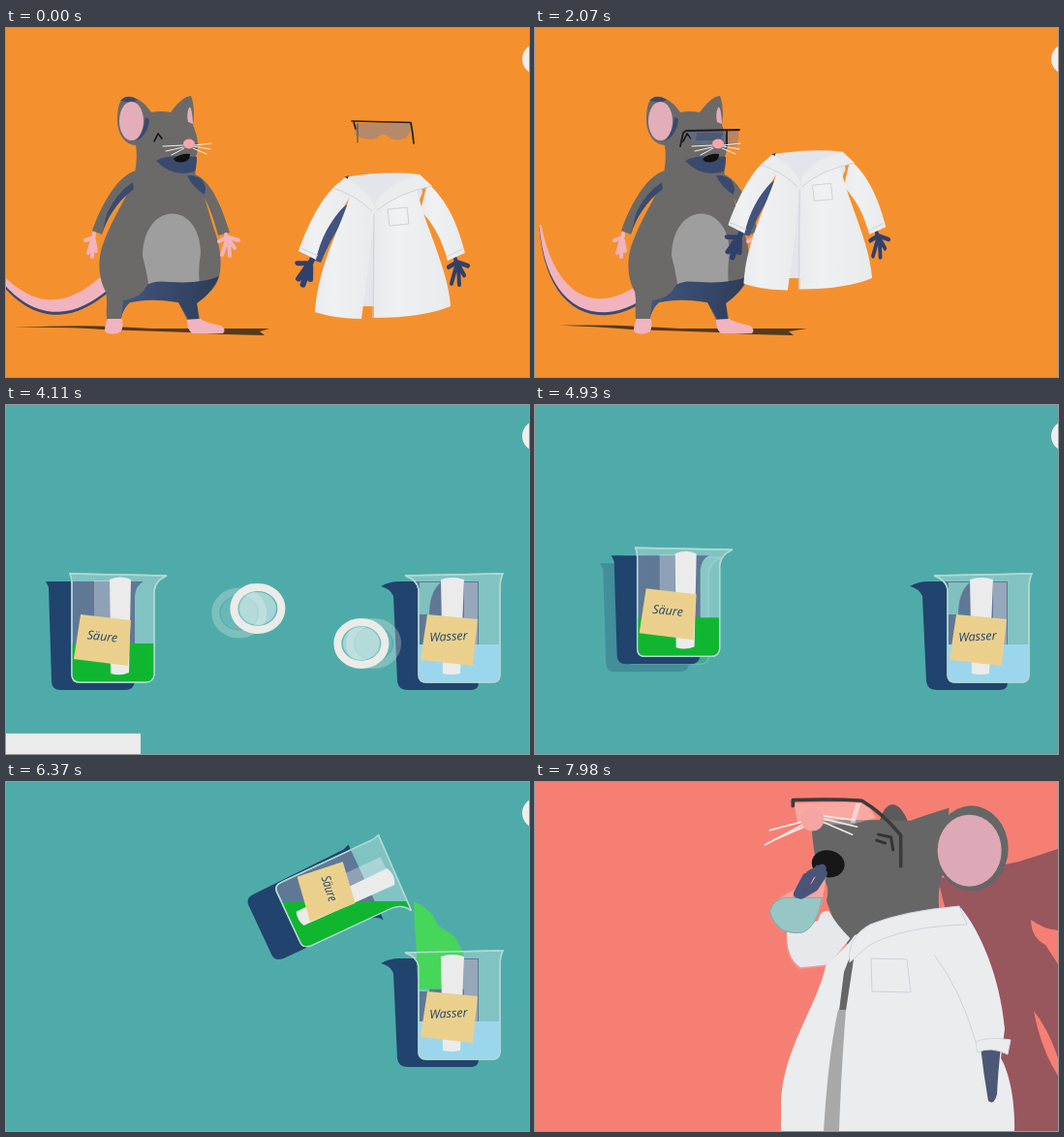
An HTML page for the animation above (8 s loop, 540 by 360 pixels).

```html
<!DOCTYPE html>
<html lang="de">
<head>
<meta charset="utf-8">
<title>Lab safety</title>
<style>
  html, body { margin: 0; width: 100%; height: 100%; overflow: hidden; background: #f5902e; }
  svg { display: block; width: 100vw; height: 100vh; }
  .grey { fill: #6b6a69; }
  .navy { fill: #3a4a6e; }
  .deep { fill: #21446e; }
  .pink { fill: #f1b4be; }
  .coat { fill: #ebecee; }
  .bar { fill: #ebebeb; }
  .glass { fill: #fff; fill-opacity: .28; stroke: #b2d8d3; stroke-width: 1.4; }
  .line { fill: none; stroke-linecap: round; stroke-linejoin: round; }
  .fold { fill: none; stroke: #cfd1da; stroke-width: 1; }
  .note { fill: #ebd08d; }
  .hand { font: italic 12.5px "Open Sans", "Noto Sans", sans-serif; fill: #21446e; text-anchor: middle; }
</style>
</head>
<body>
<svg viewBox="0 0 540 360" preserveAspectRatio="none">
  <defs>
    <path id="glassA" d="M66 174L166 176Q154 181 153 192V278Q152 286 144 286H76Q68 286 68 278V184Q68 178 66 174Z"/>
    <path id="glassB" d="M412 176L513 174Q510 180 510 190V278Q510 286 502 286H434Q426 286 426 278V190Q424 180 412 176Z"/>
    <clipPath id="inA"><use href="#glassA"/></clipPath>
    <clipPath id="inB"><use href="#glassB"/></clipPath>
    <clipPath id="flow"><rect id="flowBox" x="400" y="118" width="100" height="0"/></clipPath>
    <path id="pawL" class="line" stroke-width="4" d="M2-5L1 3M-1 0L-7 2M0 2L-4 15M1 2L0 19M2 2L4 13M0 0L1 5"/>
    <path id="pawR" class="line" stroke-width="4" d="M-1-4L1 3M0-1L-8 3M0 2L-5 17M2 2L3 18M2 1L8 10M2-1L12 2M1 0L2 5"/>
    <g id="ring">
      <ellipse rx="19" ry="17" fill="#fff" fill-opacity=".42"/>
      <ellipse rx="24.5" ry="22" fill="#fff" fill-opacity=".12" stroke="#ebebe8" stroke-width="8"/>
    </g>
    <linearGradient id="cloth">
      <stop offset="0" stop-color="#e8eaee"/><stop offset=".3" stop-color="#f0f1f2"/><stop offset="1" stop-color="#e9eaec"/>
    </linearGradient>
    <linearGradient id="dusk">
      <stop offset="0" stop-color="#40557f"/><stop offset="1" stop-color="#2f3c58"/>
    </linearGradient>
  </defs>

  <g id="dress">
    <rect width="540" height="360" fill="#f5902e"/>
    <path id="ground" fill="#533a1e"/>
    <path id="tailShade" class="navy"/>
    <path id="tail" class="pink"/>
    <g id="mouse">
      <path class="pink" d="M106 297L119 298Q122 306 119 313Q111 318 103 314Q100 311 106 297ZM187 299L198 298Q205 304 222 307Q228 311 224 315H192Q186 310 187 299Z"/>
      <path class="grey" d="M125 71C138 71 145 80 150 87Q160 85 170 87C176 79 184 70 191 70C195 80 194 92 193 100C198 112 200 122 196 133C196 142 195 148 196 154C204 167 209 190 215 208C223 230 223 248 219 260C214 272 204 278 197 284L200 300L187 301L178 283Q150 278 128 283C122 288 120 294 119 300L104 300C103 290 105 282 103 272C95 258 95 240 99 226C106 205 118 185 130 162C134 148 136 134 134 121C120 120 115 105 115 95C115 80 118 71 125 71Z"/>
      <path fill="#9e9e9e" d="M141 235C142 178 200 177 201 232Q198 250 200 264L147 264Q145 250 141 235Z"/>
      <path fill="url(#dusk)" d="M145 266Q150 260 170 262Q202 264 220 256Q214 272 197 284L199 300H188L178 283Q150 278 128 283Q122 288 119 298L121 281Q139 279 145 266Z"/>
      <path class="navy" d="M155 137Q166 130 197 133Q197 143 195 148Q172 155 155 137Z"/>
      <path class="navy" d="M118 75Q126 67 136 74L130 77ZM134 117Q147 110 148 94L144 92Q142 108 134 117Z"/>
      <ellipse fill="#e3aeb9" cx="129.500" cy="96" rx="12.500" ry="20"/>
      <path fill="#e3aeb9" d="M189 82Q192 80 193 99L188 97Q186 89 189 82Z"/>
      <path class="grey" d="M134 147C117 152 101 176 89 209L99 213C104 196 114 181 131 165Z"/>
      <path class="navy" d="M99 213C104 196 114 180 132 166L131 159Q113 171 104 192Z"/>
      <path class="grey" d="M192 150C212 155 223 186 231 211L219 214C214 195 209 180 200 168Z"/>
      <path class="navy" d="M187 152Q204 151 206 166L205 172Q192 164 187 152Z"/>
      <g id="paws" fill="none" stroke="#f1b4be">
        <use href="#pawL" transform="translate(89 217)"/>
        <use href="#pawR" transform="translate(228 217)"/>
      </g>
      <path d="M173 135Q180 129 190 130Q190 138 181 138.500Q175 139 173 135Z" fill="#111"/>
      <path class="line" d="M153 117L157 109L161 114" stroke="#111" stroke-width="1.600"/>
      <g id="worn">
        <path d="M158 107L210 106L209 121L197 123Q188 115 181 121L162 118Z" fill="#5d6d92" fill-opacity=".55"/>
        <path d="M197 107H210L209 120L200 121Z" fill="#d28a60" fill-opacity=".55"/>
        <path d="M167 108H194L192 116H166Z" fill="#38486c" fill-opacity=".5"/>
        <path class="line" d="M150 122L153 108L156 106L211 105M198 107V123" stroke="#1b1b22" stroke-width="1.800"/>
      </g>
      <path class="line" d="M183 121L162 122M183 123L165 127M184 124L171 131M194 121L212 119M194 122L211 125M193 124L207 130" stroke="#f4eeee" stroke-width="1"/>
      <ellipse cx="189" cy="119.500" rx="6" ry="5" fill="#f6a5ab"/>
    </g>

    <g id="coatOn">
      <g fill="none" stroke="#31406b">
        <use href="#pawL" transform="translate(89 217) scale(1.1)"/>
        <use href="#pawR" transform="translate(228 217) scale(1.1)"/>
      </g>
      <path class="navy" d="M95 212C102 190 116 172 132 164L130 157L100 190Z"/>
      <path class="coat" d="M124 143C104 156 90 182 82 207L97 213C102 193 113 175 130 161Z"/>
      <path class="coat" d="M196 150C216 160 228 182 235 206L219 211C214 192 206 174 192 163Z"/>
      <path class="coat" d="M122 138L148 152L171 157L169 273C145 274 115 268 95 256C94 225 112 188 126 165Z"/>
      <path class="coat" d="M177 157L198 147C208 168 219 205 221 235Q222 252 218 265Q200 275 180 273Z"/>
      <path class="navy" d="M190 156L199 153L203 163L202 171Z"/>
      <path class="coat" d="M123 134Q134 150 170 153L172 163Q140 160 117 147ZM203 136L207 147L178 164L177 154Q193 149 203 136Z"/>
      <path class="fold" d="M117 147Q140 160 172 163M207 147L178 164M183 166L195 164L197 182L184 184ZM83 204L98 210M234 203L219 208"/>
    </g>

    <g id="coatOff">
      <g fill="none" stroke="#31406b">
        <use href="#pawL" transform="translate(312 243) rotate(14) scale(1.5 1.2)"/>
        <use href="#pawR" transform="translate(465 243) scale(1 1.2)"/>
      </g>
      <path fill="#e3e5eb" d="M350 154Q390 147 427 151L430 170L382 287H367L362 170Z"/>
      <path fill="#41537f" d="M319 240C325 213 336 193 352 182L355 186C344 205 334 220 325 242Z"/>
      <path fill="url(#cloth)" d="M343 160C326 174 312 202 302 230L320 239C325 217 334 200 349 184L358 170Z"/>
      <path fill="url(#cloth)" d="M435 160C456 177 467 205 474 232L456 240C450 218 442 203 428 188Z"/>
      <path fill="url(#cloth)" d="M356 168C352 195 322 240 319 293Q340 300 367 300L373 255L381 187Z"/>
      <path fill="url(#cloth)" d="M381 187L424 164C430 200 456 245 459 287Q430 299 380 299Z"/>
      <path d="M349 154L354 152L352 158Z" fill="#374869"/>
      <path class="coat" d="M350 154Q370 164 381 184L378 189Q362 173 338 165ZM427 151L440 163Q405 170 383 188L381 182Q392 160 427 151Z"/>
      <path class="fold" d="M338 165Q362 173 378 189M440 163Q405 170 383 188M380 192L379 299M394 187L414 185L416 202L396 204ZM304 227L322 235M471 228L455 236"/>
    </g>

    <g id="goggles">
      <path d="M360 98H419Q418 113 408 115Q398 117 392 110Q386 109 383 114Q372 117 360 110Z" fill="#b08a70" fill-opacity=".9"/>
      <path class="line" d="M363 99V118" stroke="#4c443e" stroke-width="1"/>
      <path class="line" d="M357 96L418 97.500Q420 108 421 119M359 97L361 104" stroke="#20201f" stroke-width="1.700"/>
    </g>
    <use id="hintTrail" href="#ring"/><use id="hint" href="#ring"/>
    <circle cx="549" cy="32" r="16" fill="#f0eeec"/>
  </g>

  <g id="pour">
    <rect width="540" height="360" fill="#4fabaa"/>
    <rect id="panel" width="139" height="60" fill="#ebebeb"/>
    <use id="acidTrail" href="#acid" opacity=".28"/>
    <g id="acid">
      <path id="acidShade" class="deep" d="M41 182H142Q134 186 133 197V285Q132 294 123 294H57Q47 294 47 285L44 188Z"/>
      <g id="acidGlass">
        <use href="#glassA" class="glass"/>
        <path d="M91 181H107V247H91Z" fill="#fff" fill-opacity=".3"/>
        <g clip-path="url(#inA)"><rect id="acidFill" x="-20" width="260" height="160" fill="#10b62f"/></g>
        <path class="bar" d="M107 180Q118 175 129 180L127 276Q118 280 108 277Z"/>
        <path class="note" d="M77 216L129 222L126 269L70 262Z"/>
        <text class="hand" transform="translate(99 243) rotate(6)">Säure</text>
        <use href="#glassA" fill="none" stroke="#b2d8d3" stroke-width="1.400"/>
      </g>
    </g>
    <path class="deep" d="M387 187Q396 182 406 182H488V286Q488 294 480 294H415Q405 294 404 285L400 197Q396 189 387 187Z"/>
    <use href="#glassB" class="glass"/>
    <path d="M427 183H449Q437 193 437 216H427Z" fill="#80c0bf"/>
    <path d="M473 183H487V248H473Z" fill="#fff" fill-opacity=".35"/>
    <g clip-path="url(#inB)">
      <rect id="water" x="420" width="100" height="60" fill="#9cd6ec"/>
      <rect id="mix" x="420" width="100" height="60" fill="#46d65a"/>
    </g>
    <path clip-path="url(#flow)" fill="#46d65a" d="M421 123Q434 129 441 138L446 148L463 159L473 178V262Q470 284 450 284H432Q424 260 425 205Q424 170 422 150Z"/>
    <path class="bar" d="M449 180Q461 176 473 180L469 277Q460 279 451 277Z"/>
    <path class="note" d="M435 216L487 221L482 269L428 263Z"/>
    <text class="hand" transform="translate(457 243) rotate(-3)">Wasser</text>
    <use href="#glassB" fill="none" stroke="#b2d8d3" stroke-width="1.400"/>
    <use id="leftTrail" href="#ring"/><use id="left" href="#ring"/>
    <use id="rightTrail" href="#ring"/><use id="right" href="#ring"/>
    <circle cx="549" cy="32" r="16" fill="#f0eeec"/>
  </g>

  <g id="drink">
    <rect width="540" height="360" fill="#f67f74"/>
    <path fill="#98565d" d="M416 100L500 82L540 69V360H480Z"/>
    <path fill="#f67f74" d="M512 142Q525 152 540 153V188L527 168Q512 160 512 142ZM515 236Q530 255 540 285V303Q522 275 515 236Z"/>
    <use id="headTrail" href="#head" opacity=".22"/>
    <g id="head">
      <path fill="#5b5a5a" d="M356 42C362 18 376 16 386 42Z"/>
      <path fill="#666" d="M286 42C300 37 340 40 362 39L388 40Q405 34 428 27L424 90Q412 112 420 150L328 176Q308 145 301 122Q306 105 294 95Q287 70 286 42Z"/>
      <ellipse cx="451" cy="69" rx="38" ry="44" fill="#666"/>
      <ellipse cx="449" cy="71" rx="33" ry="37" fill="#dda9b6"/>
      <ellipse cx="303" cy="84" rx="17" ry="14" fill="#171717" transform="rotate(12 303 84)"/>
      <path d="M268 21L342 20L353 37L326 44L272 42Z" fill="#fff" fill-opacity=".28"/>
      <path d="M332 22H337L331 42H326Z" fill="#fff" fill-opacity=".45"/>
      <path class="line" d="M267 24V18Q310 17 338 19Q360 32 378 55V87" stroke="#3c3b3b" stroke-width="3.600"/>
      <path class="line" d="M355 54L368 57L370 70M353 60L362 63" stroke="#333" stroke-width="3"/>
      <path class="line" d="M278 40L243 49M278 43L238 64M280 45L250 58M296 37L333 46M296 40L328 54M294 34L330 39" stroke="#f5e9e7" stroke-width="1.600"/>
      <circle cx="287" cy="38" r="12" fill="#f4a5a4"/>
    </g>
    <path id="arm" fill="#4b5876" d="M460 273H481Q478 300 477 322Q474 334 468 329Q463 300 460 273Z"/>
    <path class="coat" d="M325 165L300 190C292 230 256 275 254 330V360H495C496 330 490 300 481 285L485 255C480 200 460 155 440 130L418 133L330 158Z"/>
    <path fill="#666" d="M326 178L329 183L321 236H314L319 196Z"/>
    <path fill="#a8a8a8" d="M313 235H321Q316 300 314 360H298Q303 280 313 235Z"/>
    <use href="#arm"/>
    <path class="coat" stroke="#d3d6de" d="M455 268Q470 262 491 266L488 281Q470 272 457 279Z"/>
    <path class="coat" stroke="#cfd3de" d="M325 186Q322 160 346 147Q380 133 438 128L446 147Q380 149 344 169Z"/>
    <path class="fold" stroke-width="1.400" d="M347 182L384 183L388 217L348 216ZM412 178Q440 215 455 268"/>
    <use id="flaskTrail" href="#flask" opacity=".25"/>
    <g id="flask">
      <path fill="#e6e8ec" d="M261 150Q259 180 275 190L304 187L326 160Q312 146 304 132Q295 130 293 142Z"/>
      <path fill="#fff" fill-opacity=".25" d="M292 84L302 94L297 122Q291 150 276 154Q250 157 243 131Q248 119 268 110Z"/>
      <path fill="#97c6c6" stroke="#83a7a9" d="M243 132Q247 118 262 118H297Q291 150 276 154Q250 157 243 132Z"/>
      <path class="line" d="M297 88L285 94L279 106M298 93L289 107L275 115M281 97L272 114" stroke="#4a5478" stroke-width="9"/>
    </g>
  </g>
</svg>
<script>
const LOOP = 8000, TO_POUR = 3410, TO_DRINK = 6950, LAG = 54;
const el = {};
document.querySelectorAll("[id]").forEach(e => el[e.id] = e);

const seg = (t, a, b) => Math.min(1, Math.max(0, (t - a) / (b - a)));
const ease = (t, a, b) => { const u = seg(t, a, b); return u * u * (3 - 2 * u); };
const lerp = (a, b, u) => a + (b - a) * u;
const set = (e, o) => { for (const k in o) e.setAttribute(k, o[k]); };
const show = (e, on) => { e.style.display = on ? "" : "none"; };
const move = (e, x, y, more = "") => e.setAttribute("transform", `translate(${x} ${y}) ${more}`);
const about = (x, y, change) => `translate(${x} ${y}) ${change} translate(${-x} ${-y})`;

// Tail curve as four control points at chosen times
const TAIL = [
  [0, [103, 262, 62, 298, 22, 298, -20, 238]],
  [1240, [102, 264, 60, 301, 14, 302, -10, 232]],
  [2830, [108, 284, 60, 304, 17, 262, 19, 178]],
  [3410, [108, 285, 60, 304, 14, 268, 15, 184]]
];

function tailShape(c, drop) {
  const up = [], down = [];
  for (let i = 0; i <= 20; i++) {
    const u = i / 20, v = 1 - u;
    const at = k => v*v*v*c[k] + 3*v*v*u*c[k+2] + 3*v*u*u*c[k+4] + u*u*u*c[k+6];
    const slope = k => v*v*(c[k+2]-c[k]) + 2*v*u*(c[k+4]-c[k+2]) + u*u*(c[k+6]-c[k+4]);
    const dx = slope(0), dy = slope(1), w = (1 + 6.5 * (1 - u * u)) / Math.hypot(dx, dy);
    up.push(`${at(0) - dy*w} ${at(1) + dx*w + drop}`);
    down.unshift(`${at(0) + dy*w} ${at(1) - dx*w + drop}`);
  }
  return "M" + up.concat(down).join("L") + "Z";
}

function drag(name, t, from, to, start, end) {
  const fade = seg(t, start, start + 90) * (1 - seg(t, end - 20, end + 110));
  [["", 0, 1], ["Trail", LAG, .3]].forEach(([suffix, lag, alpha]) => {
    const p = ease(t - lag, start, end), e = el[name + suffix];
    move(e, lerp(from[0], to[0], p), lerp(from[1], to[1], p));
    e.setAttribute("opacity", fade * alpha);
  });
}

function drawDress(t) {
  let i = 0;
  while (i < TAIL.length - 2 && t > TAIL[i + 1][0]) i++;
  const [a, from] = TAIL[i], [b, to] = TAIL[i + 1];
  const curve = from.map((v, k) => lerp(v, to[k], ease(t, a, b)));
  el.tail.setAttribute("d", tailShape(curve, 0));
  el.tailShade.setAttribute("d", tailShape(curve, 3));
  const g = ease(t, 1240, 2830), end = lerp(272, 281, seg(t, 0, 1200));
  const tip = `${lerp(8, 40, g)} ${lerp(309, 305, g)}`;
  el.ground.setAttribute("d", `M${tip}Q70 306 112 308L150 310L${end} 310L262 313L267 317L225 316L190 314L100 311Q60 308 ${tip}Z`);

  const p = ease(t, 70, 1200), q = ease(t, 1720, 2450);
  move(el.goggles, lerp(0, -170, p), lerp(0, 19, p) - 66 * Math.sin(Math.PI * p), `scale(${lerp(1, .9, p)})`);
  move(el.coatOff, -184 * q, -2 * q - 16 * Math.sin(Math.PI * q), `scale(${lerp(1, .888, q)} ${lerp(1, .91, q)})`);
  show(el.goggles, p < 1);
  show(el.worn, p === 1);
  show(el.coatOff, q < 1);
  show(el.coatOn, q === 1);
  show(el.paws, q < 1);
  drag("hint", t, [380, 222], [165, 222], 750, 1530);
}

function acidPos(t) {
  const p = ease(t, 4630, 5820);
  return [236 * p, -116 * p - 17 * Math.sin(Math.PI * p)];
}

function drawPour(t) {
  const [x, y] = acidPos(t), [px, py] = acidPos(t - LAG);
  move(el.acid, x, y);
  move(el.acidTrail, px - x, py - y);
  show(el.acidTrail, Math.hypot(px - x, py - y) > .5);

  // Tilting towards the viewer narrows and lengthens the beaker
  const u = ease(t, 5560, 6340), turn = 65 * u, sx = 1 - .15 * u, sy = 1 + .07 * u;
  const tilt = `rotate(${turn}) scale(${sx} ${sy})`;
  move(el.acidShade, -8 * u, 4 * u, about(88, 238, tilt));
  el.acidGlass.setAttribute("transform", about(110, 230, tilt));
  set(el.acidFill, {
    y: 230 + lerp(16, 9, u) + 14 * seg(t, 6400, TO_DRINK),
    transform: about(110, 230, `scale(${1 / sx} ${1 / sy}) rotate(${-turn})`)
  });
  el.flowBox.setAttribute("height", 95 * seg(t, 6250, 6370) + 75 * seg(t, 6370, 6470));
  const level = 247 - 14 * seg(t, 6460, TO_DRINK);
  set(el.water, { y: level });
  set(el.mix, { y: level, opacity: .8 * seg(t, 6450, 6850) });
  el.panel.setAttribute("y", lerp(318, 362, ease(t, 4000, 4230)));
  drag("left", t, [110, 246], [330, 193], 3550, 4450);
  drag("right", t, [467, 246], [320, 246], 3550, 4450);
}

function drawDrink(t) {
  const pose = time => 1 - ease(time, TO_DRINK + 150, 8080);
  [["", 0], ["Trail", LAG]].forEach(([suffix, lag]) => {
    // Copies inherit the main pose, so trails only add the difference
    const k = pose(t - lag) - (lag ? pose(t) : 0);
    el["head" + suffix].setAttribute("transform", `rotate(${-10 * k} 375 140)`);
    move(el["flask" + suffix], -22 * k, 46 * k);
  });
}

function frame() {
  const t = performance.now() % LOOP;
  const scene = t < TO_POUR ? 0 : t < TO_DRINK ? 1 : 2;
  [el.dress, el.pour, el.drink].forEach((e, i) => show(e, i === scene));
  [drawDress, drawPour, drawDrink][scene](t);
  requestAnimationFrame(frame);
}
frame();
</script>
</body>
</html>
```
